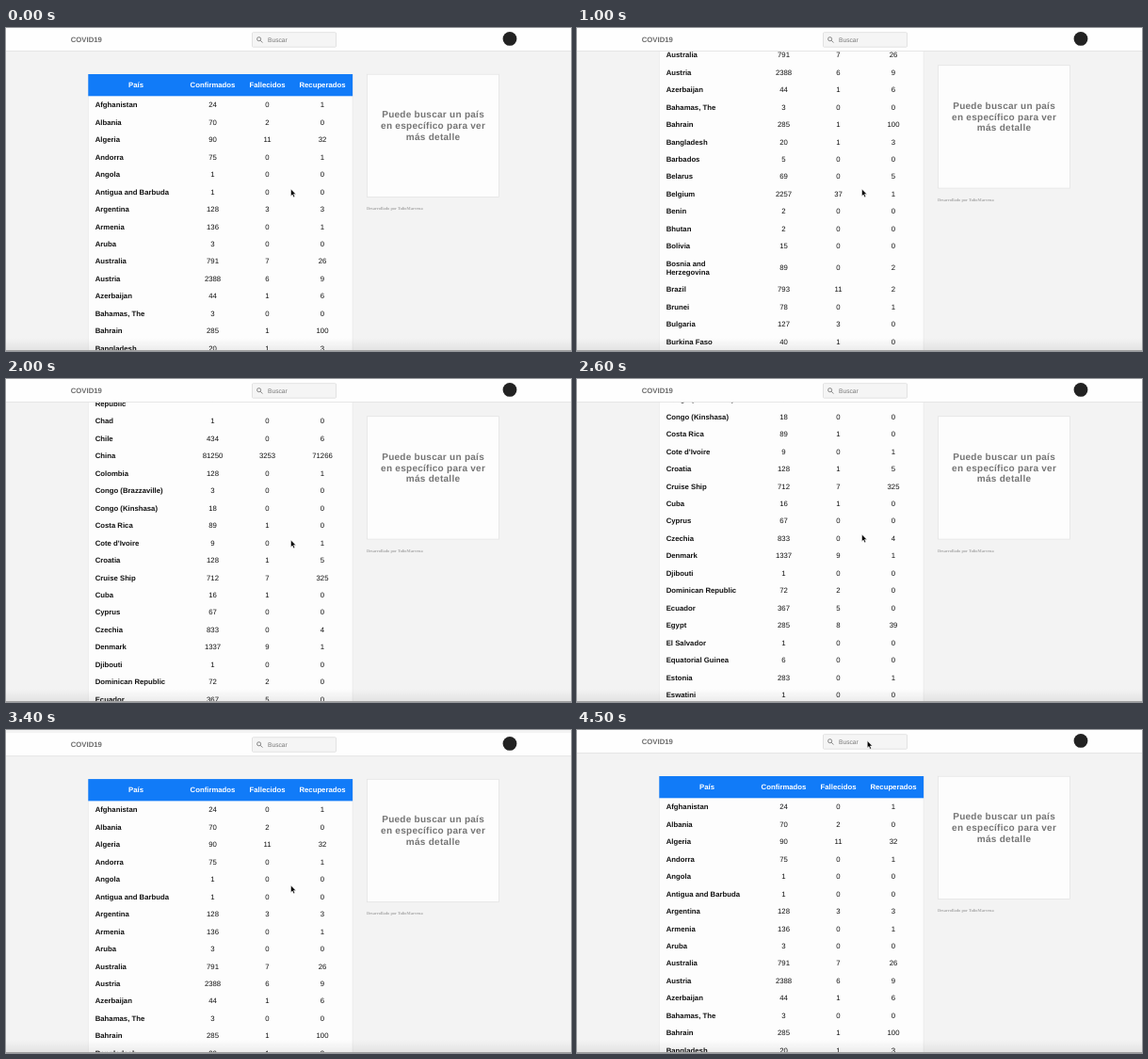
Write an HTML page that moves like this. It is 600 px wide and 343 px high and loops after 5 s.

```html
<!DOCTYPE html>
<html lang="es">
<head>
<meta charset="utf-8">
<title>COVID19</title>
<style>
  html, body { margin: 0; width: 100%; height: 100%; overflow: hidden; background: #f3f3f3; }
  svg { display: block; width: 600px; height: 343px; font: 7.75px "Liberation Sans", Arial, sans-serif; text-rendering: geometricPrecision; }
  .bold { font-weight: 700; }
  .mid { text-anchor: middle; }
</style>
</head>
<body>
<svg viewBox="0 0 600 343">
  <linearGradient id="shade" x2="0" y2="1">
    <stop offset="0" stop-opacity="0"/>
    <stop offset="1" stop-opacity=".07"/>
  </linearGradient>
  <rect width="600" height="343" fill="#f3f3f3"/>
  <g id="table">
    <rect x="87" y="49" width="281.5" height="1150" fill="#e9e9e9"/>
    <rect x="87.7" y="49" width="280" height="1150" fill="#fdfdfd"/>
    <rect x="87.3" y="49" width="280.8" height="23.3" fill="#117bf8"/>
    <g id="head" class="bold mid" fill="#fff"></g>
    <g id="rows" fill="#111"></g>
  </g>
  <g id="side">
    <rect x="383.4" y="49.2" width="140" height="130.4" fill="#fdfdfd" stroke="#e4e4e4" stroke-width=".8"/>
    <g class="bold mid" font-size="10" letter-spacing=".27" fill="#757575">
      <text x="453.6" y="95.1">Puede buscar un país</text>
      <text x="453.6" y="107">en específico para ver</text>
      <text x="453.6" y="118.8">más detalle</text>
    </g>
    <text x="383" y="193.4" fill="#a8a8a8" style="font: 700 4.4px 'Liberation Serif', Times, serif">Desarrollado por TulioMarvena</text>
  </g>
  <g id="bar">
    <rect width="600" height="24.5" fill="#fefefe"/>
    <rect y="24.2" width="600" height=".8" fill="#e2e2e2"/>
    <text class="bold" x="68.7" y="15.2" fill="#6c6c6c">COVID19</text>
    <rect x="261.5" y="4.7" width="89" height="15.5" rx="1" fill="#f5f5f5" stroke="#dcdcdc" stroke-width=".8"/>
    <g fill="none" stroke="#777" stroke-width=".9">
      <circle cx="268.6" cy="11.7" r="2"/>
      <path d="M270.1 13.2l2.3 2.3"/>
    </g>
    <text x="278" y="14.7" font-size="6.7" fill="#777">Buscar</text>
    <circle cx="535" cy="11.4" r="7.4" fill="#222"/>
  </g>
  <rect y="329" width="600" height="14" fill="url(#shade)"/>
  <rect y="342" width="600" height="1" fill="#a0a0a0"/>
  <path id="cursor" d="M0 0V7.4L1.7 5.9L2.9 8.7L4.2 8.1L3 5.4H5.3Z" fill="#000" stroke="#fff" stroke-width=".5"/>
</svg>
<script>
// name|confirmed|deaths|recovered; missing counts are 0, "/" breaks a name
const data = `Afghanistan|24||1
Albania|70|2
Algeria|90|11|32
Andorra|75||1
Angola|1
Antigua and Barbuda|1
Argentina|128|3|3
Armenia|136||1
Aruba|3
Australia|791|7|26
Austria|2388|6|9
Azerbaijan|44|1|6
Bahamas, The|3
Bahrain|285|1|100
Bangladesh|20|1|3
Barbados|5
Belarus|69||5
Belgium|2257|37|1
Benin|2
Bhutan|2
Bolivia|15
Bosnia and/Herzegovina|89||2
Brazil|793|11|2
Brunei|78||1
Bulgaria|127|3
Burkina Faso|40|1
Cabo Verde|1
Cambodia|51||1
Cameroon|20
Canada|943|12|9
Central African/Republic|3
Chad|1
Chile|434||6
China|81250|3253|71266
Colombia|128||1
Congo (Brazzaville)|3
Congo (Kinshasa)|18
Costa Rica|89|1
Cote d'Ivoire|9||1
Croatia|128|1|5
Cruise Ship|712|7|325
Cuba|16|1
Cyprus|67
Czechia|833||4
Denmark|1337|9|1
Djibouti|1
Dominican Republic|72|2
Ecuador|367|5
Egypt|285|8|39
El Salvador|1
Equatorial Guinea|6
Estonia|283||1
Eswatini|1
Ethiopia|6`;

const $ = id => document.getElementById(id);
const columns = [138, 219.5, 277.5, 336];
const label = (x, y, text, cls) => `<text x="${x}" y="${y}" class="${cls}">${text}</text>`;

function buildRows() {
  let y = 72.3, html = '';
  for (const line of data.split('\n')) {
    const [name, ...counts] = line.split('|');
    const parts = name.split('/');
    const height = parts.length > 1 ? 27.4 : 18.46;
    const base = y + height / 2 + 2.8;
    parts.forEach((part, i) => {
      html += label(94.7, base + (i - (parts.length - 1) / 2) * 8.8, part, 'bold');
    });
    for (let i = 0; i < 3; i++) html += label(columns[i + 1], base, counts[i] || 0, 'mid');
    y += height;
  }
  return html;
}

$('head').innerHTML = ['País', 'Confirmados', 'Fallecidos', 'Recuperados']
  .map((title, i) => label(columns[i], 63.3, title, '')).join('');
$('rows').innerHTML = buildRows();

// Keys are [time, value, ease]: positive eases in, negative eases out, 0 does both
const scrollKeys = [[200, 0], [1000, 219.2, 2], [1400, 461.7, 1], [2000, 627.1, -2], [2300, 730, 0],
  [2400, 730, 1], [2600, 724.1, 2], [3100, 30, 0], [3300, -6, -2], [3800, 0, -3]];
const xKeys = [[3600, 302.5], [4200, 300, 0], [4400, 312, 1], [4500, 308.3, 1]];
const yKeys = [[2400, 171], [2500, 165, 1], [3600, 165, 1], [4200, 14, 0], [4300, 6, 1], [4500, 11.5, 1]];

function ease(p, n) {
  if (n === 0) return p * p * (3 - 2 * p);
  return n > 0 ? p ** n : 1 - (1 - p) ** -n;
}

function track(keys, t) {
  const i = keys.findIndex(key => key[0] > t);
  if (i < 0) return keys[keys.length - 1][1];
  if (i === 0) return keys[0][1];
  const [t0, a] = keys[i - 1], [t1, b, n] = keys[i];
  return a + (b - a) * ease((t - t0) / (t1 - t0), n);
}

const move = (id, x, y) => $(id).setAttribute('transform', `translate(${x} ${y})`);

function draw() {
  const t = Math.floor(performance.now() % 5000 / 100) * 100;
  const offset = track(scrollKeys, t);
  move('table', 0, -offset);
  move('side', 0, -Math.min(offset, 9.5)); // sticky
  move('bar', 0, Math.max(0, -offset));    // overscroll bounce
  move('cursor', track(xKeys, t), track(yKeys, t));
  requestAnimationFrame(draw);
}
draw();
</script>
</body>
</html>
```
